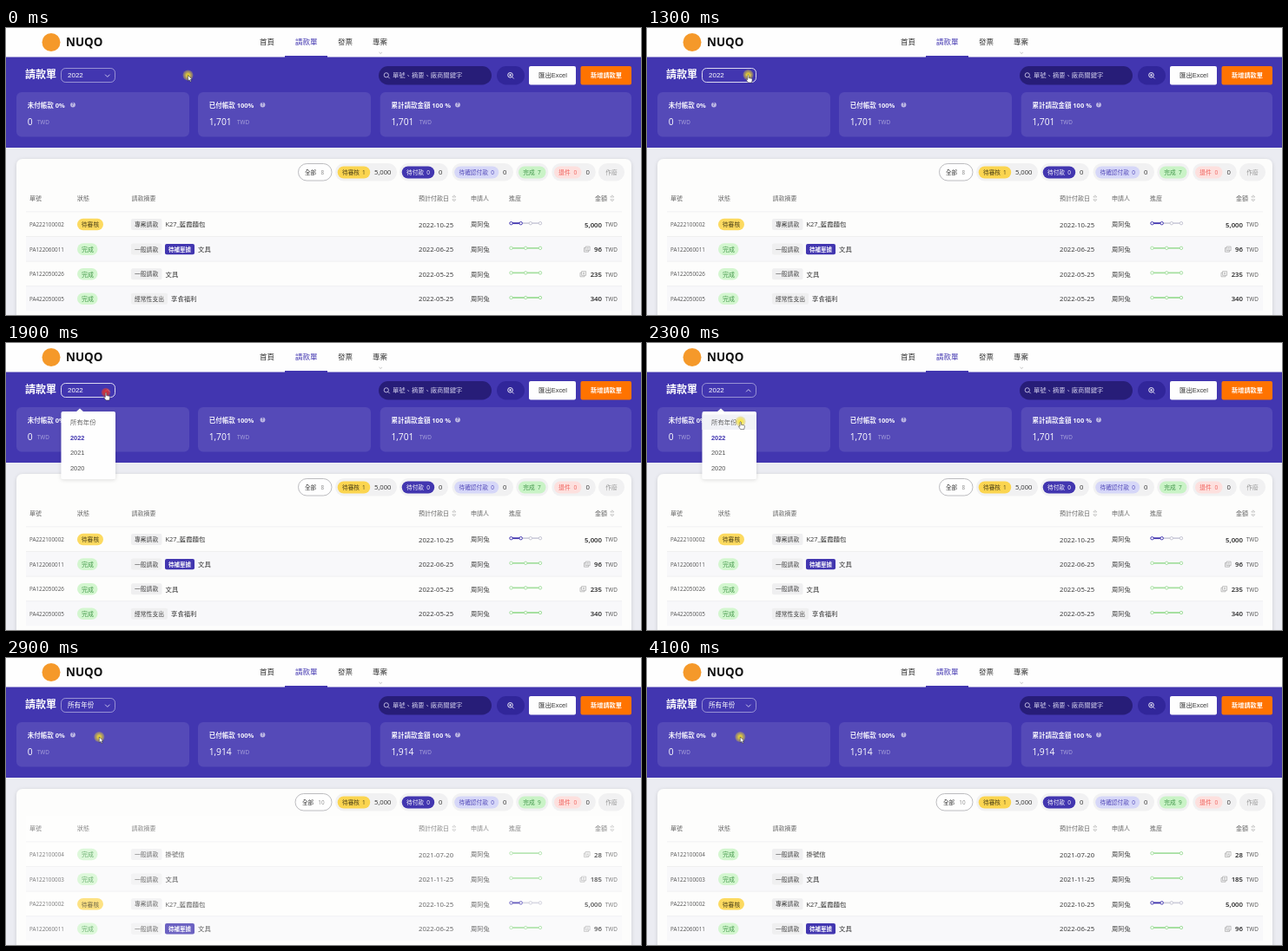
An HTML page for the animation above (5.5 s loop, 731x331 px).

```html
<!DOCTYPE html>
<html lang="zh-Hant">
<head>
<meta charset="utf-8">
<title>請款單</title>
<style>
html, body { margin: 0; width: 100%; height: 100%; overflow: hidden; background: #ebecf2; }
svg { display: block; width: 731px; height: 331px; }
text { font-family: "Open Sans", "Noto Sans CJK TC", "Noto Sans CJK", sans-serif; white-space: pre; }
.arial { font-family: "Liberation Sans", "Noto Sans CJK TC", "Noto Sans CJK", sans-serif; }
</style>
</head>
<body>
<svg id="stage" viewBox="0 0 731 331"></svg>
<script>
const PURPLE = '#4236b0', GREEN = '#a5dfa0', INK = '#333';
const $ = id => document.getElementById(id);

// Texts are placed by left edge and vertical centre.
const text = (x, cy, str, size, fill, extra = '') =>
  `<text x="${x}" y="${cy + size * 0.36}" font-size="${size}" fill="${fill}" ${extra}>${str}</text>`;
const box = (x, y, w, h, r, fill, extra = '') =>
  `<rect x="${x}" y="${y}" width="${w}" height="${h}" rx="${r}" fill="${fill}" ${extra}/>`;
const line = (d, stroke, width = 1, extra = '') =>
  `<path d="${d}" fill="none" stroke="${stroke}" stroke-width="${width}" ${extra}/>`;
const group = (id, body) => `<g id="${id}">${body}</g>`;
const BOLD = 'font-weight="700"', SEMI = 'font-weight="600"', ARIAL = 'class="arial"';

function header() {
  const nav = [[292, '首頁'], [333, '請款單'], [382, '發票'], [422, '專案']];
  return box(0, 0, 731, 34, 0, '#fefefe') +
    '<circle cx="52" cy="16.5" r="10.5" fill="#f5992a"/>' +
    text(69, 15.8, 'NUQO', 13.4, '#111', BOLD) +
    nav.map(([x, s], i) => text(x, 15.5, s, 8.5, i == 1 ? PURPLE : INK, 'font-weight="500"')).join('') +
    line('M429.5 28 l1.7 1.5 l1.7 -1.5', '#aaa', 0.7) +
    box(0, 33.5, 731, 104.5, 0, PURPLE) +
    box(321, 32, 49, 2, 0, PURPLE);
}

function toolbar() {
  return text(22, 54, '請款單', 12, '#fff', BOLD) +
    box(63.5, 46.5, 62, 16, 5, 'none', 'id="select" stroke="#fff" stroke-width="0.9"') +
    text(71, 54.5, '', 8, '#fff', ARIAL + ' id="year"') +
    group('chevron', line('M-2.7 1.3 L0 -1.4 L2.7 1.3', '#d5d2f0', 0.9)) +
    box(429, 44, 130, 21.5, 10.7, '#271d78') +
    '<circle cx="437.8" cy="54.3" r="2.6" fill="none" stroke="#dddaf5" stroke-width="0.8"/>' +
    line('M439.8 56.3 l1.9 1.9', '#dddaf5', 0.8) +
    text(445, 54.7, '單號、摘要、廠商關鍵字', 7.3, '#cfccea') +
    box(565, 44, 32, 21.5, 10.7, '#31269a') +
    '<circle cx="580.5" cy="54.3" r="2.8" fill="none" stroke="#fff" stroke-width="0.9"/>' +
    line('M582.6 56.4 l2 2 M579.1 54.3 h2.8 M580.5 52.9 v2.8', '#fff', 0.8) +
    box(602, 44, 54, 21.5, 2, '#fefefe') +
    text(613, 54.7, '匯出Excel', 7.4, INK, ARIAL) +
    box(661.5, 44, 58.5, 21.5, 2, '#ff7300') +
    text(673, 54.7, '新增請款單', 7.2, '#fff', BOLD);
}

function card(x, w, title, help, amount, id) {
  return box(x, 74, w, 51.5, 6, '#554ab8') +
    text(x + 12.7, 89.5, title, 7.5, '#f4f3fc', BOLD) +
    `<circle cx="${help}" cy="88.6" r="2.9" fill="#bdb8e3"/>` +
    text(help - 1.2, 88.7, '?', 4.6, '#4a3fb2', BOLD) +
    text(x + 12.7, 107.8, amount, 10.3, '#fff', `id="${id}"`) +
    text(x + (amount.length > 1 ? 45 : 23.7), 109, 'TWD', 6.4, '#aaa4dc');
}

function pill(x, w, inner, fill, ink, label, count, countX, total, id = '') {
  return box(x, 156, w, 20.5, 10, '#f1f1f2') +
    box(x + 2.7, 159.5, inner, 14, 7, fill) +
    text(x + 8, 166.5, label, 6.7, ink) +
    text(countX, 166.5, count, 6.5, ink, id) +
    (total ? text(...total, 7.7, INK) : '');
}

const sorter = x => line(`M${x - 2} 195 l2 -2.2 l2 2.2 Z M${x - 2} 197.8 l2 2.2 l2 -2.2 Z`, '#aaa', 0.6);

function panel() {
  const heads = [[27, '單號'], [82, '狀態'], [144.5, '請款摘要'], [475, '預計付款日'],
    [535, '申請人'], [579, '進度'], [678, '金額']];
  return box(12, 151, 708, 190, 7, '#fdfdfc', 'filter="url(#soft)"') +
    box(336.5, 156.5, 38.5, 19.5, 9.7, '#fefefe', 'id="allBox" stroke="#b5b5b8" stroke-width="0.9"') +
    text(344, 166.5, '全部', 6.6, INK, 'id="allText"') +
    text(362.5, 166.5, '8', 6.3, '#888', 'id="allCount"') +
    pill(379, 71, 37.5, '#fbd550', '#4d4218', '待審核', '1', 410, [424, 166.5, '5,000']) +
    pill(453, 56, 37.5, PURPLE, '#fff', '待付款', '0', 484.3, [498, 166.5, '0']) +
    pill(513.5, 70.5, 51, '#d6d7f8', '#5147b8', '待確認付款', '0', 558.2, [572, 166.5, '0']) +
    pill(587.3, 37, 31.5, '#c9f3c6', '#40964a', '完成', '7', 612, null, 'id="doneCount"') +
    pill(628.3, 50.5, 31.5, '#fde0de', '#f0605a', '退件', '0', 653.5, [667.5, 166.5, '0']) +
    box(682, 156, 30, 20.5, 10, '#f1f1f2') + text(690.3, 166.5, '作廢', 6.7, '#999') +
    heads.map(([x, s]) => text(x, 196.8, s, 7, '#666')).join('') + sorter(515.8) + sorter(697.8);
}

function progress(y, steps, done) {
  const at = i => 581.5 + 33.5 * i / (steps - 1);
  let out = line(`M581.5 ${y} H615`, done ? GREEN : '#cfcfdc', 1.8);
  if (!done) out += line(`M581.5 ${y} H${at(1)}`, PURPLE, 1.8);
  for (let i = 0; i < steps; i++) {
    const color = done ? GREEN : i < 2 ? PURPLE : '#c6c6d4';
    out += `<circle cx="${at(i)}" cy="${y}" r="1.7" fill="#fff" stroke="${color}" stroke-width="1"/>`;
  }
  return out;
}

function row(r, i) {
  const y = 226.5 + 28.6 * i, tagWidth = r.tag.length > 4 ? 42 : 35.5;
  let x = 144 + tagWidth + 4;
  let out = box(23, y - 14.6, 686, 28.6, 0, i % 2 ? '#f8f8fa' : '#fdfdfc') +
    line(`M23 ${y - 14.6} H709`, '#ececee', 0.8) +
    text(27, y + 0.4, r.id, 6.3, '#555') +
    (r.done ? box(82, y - 6.8, 23.5, 13.6, 6.8, '#d3f6cf') + text(87, y + 0.4, '完成', 7, '#459a4c')
            : box(82, y - 6.8, 30, 13.6, 6.8, '#fcda60') + text(86.8, y + 0.4, '待審核', 6.8, '#4d4218')) +
    box(144, y - 6.5, tagWidth, 13, 2, '#efeff0') + text(148, y + 0.3, r.tag, 6.8, '#444');
  if (r.badge) {
    out += box(183, y - 6.2, 34, 12.4, 2, PURPLE) + text(187, y + 0.3, '待補單據', 6.5, '#fff', BOLD);
    x = 221;
  }
  out += text(x, y + 0.2, r.what, 7.4, INK) +
    text(475, y + 0.4, r.date, 7.7, INK) +
    text(535, y + 0.4, '周阿兔', 7.2, '#444') +
    progress(y - 1.3, r.steps, r.done) +
    text(686, y + 0.2, r.sum, 7.8, '#222', SEMI + ' text-anchor="end"') +
    text(689.8, y + 0.5, 'TWD', 6.4, '#555');
  if (r.copy) {
    const cx = 686 - r.sum.length * 4.5 - 11.5;
    out += line(`M${cx + 1.6} ${y - 3} h5 v4.6 h-5 Z M${cx + 1.6} ${y - 1.5} h-1.6 v4.6 h5 v-1.5 M${cx + 3} ${y - 1.4} h2.2 M${cx + 3} ${y} h2.2`, '#999', 0.6);
  }
  return out;
}

const entry = (id, done, tag, what, date, steps, sum, copy, badge) =>
  ({ id, done, tag, what, date, steps, sum, copy, badge });
const cake = entry('PA222100002', 0, '專案請款', 'K27_藍霞麵包', '2022-10-25', 4, '5,000');
const paper = entry('PA122060011', 1, '一般請款', '文具', '2022-06-25', 3, '96', 1, 1);
const rows2022 = [cake, paper,
  entry('PA122050026', 1, '一般請款', '文具', '2022-05-25', 3, '235', 1),
  entry('PA422050005', 1, '經常性支出', '享食福利', '2022-05-25', 3, '340')];
const rowsAll = [
  entry('PA122100004', 1, '一般請款', '掛號信', '2021-07-20', 2, '28', 1),
  entry('PA122100003', 1, '一般請款', '文具', '2021-11-25', 2, '185', 1),
  cake, paper];

function dropdown() {
  const years = ['2022', '2021', '2020'];
  return '<path d="M80.5 79.5 L85 75.5 L89.5 79.5 Z" fill="#fefefe"/>' +
    box(63.5, 79, 62.5, 78, 2, '#fefefe', 'filter="url(#soft)"') +
    box(63.5, 82.5, 62.5, 17.5, 0, '#f1f2f7', 'id="hover"') +
    text(74, 91, '所有年份', 7.4, '#666') +
    years.map((s, i) => text(74, 109 + 17.8 * i, s, 7.4, i ? '#555' : PURPLE, ARIAL + (i ? '' : BOLD))).join('');
}

const pointer =
  '<circle id="halo" r="6"/>' +
  group('arrow', '<path d="M0 0 V6.6 L1.6 5.2 L2.7 7.6 L3.8 7.1 L2.7 4.8 H4.8 Z" fill="#fff" stroke="#222" stroke-width="0.5"/>') +
  group('hand', '<path d="M-0.7 0.6 Q0 -0.4 0.7 0.6 V3.6 L4 4.3 Q4.9 4.6 4.7 5.8 L4 9 H0 L-2.3 5.8 Q-2.2 4.7 -0.7 5.6 Z" fill="#fff" stroke="#222" stroke-width="0.5"/>');

$('stage').innerHTML = `
  <defs>
    <filter id="soft" x="-10%" y="-10%" width="120%" height="120%">
      <feDropShadow dx="0" dy="1" stdDeviation="2" flood-color="#223" flood-opacity="0.14"/>
    </filter>
    <radialGradient id="yellow"><stop offset="0.3" stop-color="#ffe81e" stop-opacity="0.8"/><stop offset="1" stop-color="#d8c23c" stop-opacity="0.3"/></radialGradient>
    <radialGradient id="red"><stop offset="0.5" stop-color="#e0332c" stop-opacity="0.85"/><stop offset="1" stop-color="#d8403c" stop-opacity="0.45"/></radialGradient>
  </defs>` +
  box(0, 0, 731, 331, 0, '#ebecf2') + header() + toolbar() +
  card(12, 199, '未付帳款 0%', 77, '0', 'unpaid') +
  card(221, 199, '已付帳款 100%', 295.5, '1,701', 'paid') +
  card(430.7, 289.3, '累計請款金額 100 %', 520, '1,701', 'total') +
  panel() + group('before', rows2022.map(row).join('')) + group('after', rowsAll.map(row).join('')) +
  group('mask', box(23, 182, 686, 149, 0, '#fdfdfc')) +
  '<circle id="spinner" cx="366" cy="312.4" r="8.4" fill="none" stroke="#4236b0" stroke-width="0.9" stroke-linecap="round"/>' +
  group('menu', dropdown()) + group('pointer', pointer);

const set = (id, name, value) => $(id).setAttribute(name, value);
const show = (id, on) => set(id, 'visibility', on ? 'visible' : 'hidden');
const put = (id, str) => { $(id).textContent = str; };
const ramp = (t, from, length) => Math.min(1, Math.max(0, (t - from) / length));
const smooth = p => p * p * (3 - 2 * p);
const easeOut = (p, power) => 1 - (1 - p) ** power;

// Pointer stops: time, x, y
const path = [[800, 209.5, 54.5], [1250, 116.5, 54], [1300, 116.5, 54], [1350, 115, 57],
  [1950, 115, 57], [2300, 107.7, 90.6], [2500, 107.3, 91]];

function pointerAt(t) {
  let [, x, y] = path[0];
  for (let i = 1; i < path.length; i++) {
    const [t0, x0, y0] = path[i - 1], [t1, x1, y1] = path[i];
    const p = smooth(ramp(t, t0, t1 - t0));
    x += (x1 - x0) * p;
    y += (y1 - y0) * p;
  }
  return [x, y];
}

const OPEN = 1550, CLOSE = 2600, SWAP = 2800;

function draw(t) {
  const [x, y] = pointerAt(t);
  const pressed = t >= 1400 && t < 1950 || t >= CLOSE && t < 2850;
  const overSelect = x < 125 && y < 63;
  const hand = overSelect || t > 1950 && t < 2650;
  set('pointer', 'transform', `translate(${x} ${y})`);
  set('halo', 'fill', pressed ? 'url(#red)' : 'url(#yellow)');
  set('halo', 'r', pressed ? 5.2 : 6);
  show('arrow', !hand);
  show('hand', hand);

  const closing = t >= CLOSE;
  const p = closing ? ramp(t, CLOSE, 300) : ramp(t, OPEN, 300);
  const open = closing ? 1 - easeOut(p, 5) : easeOut(p, 5);
  set('menu', 'transform', `translate(0 ${79 * (1 - open)}) scale(1 ${open})`);
  set('menu', 'opacity', open);
  show('menu', open > 0.01);
  show('hover', open > 0.01 && y > 82 && !(t >= 2650));
  const turn = closing ? 180 * easeOut(p, 2) : 180 * (1 - easeOut(p, 2));
  set('chevron', 'transform', `translate(116.8 55) rotate(${turn})`);
  set('select', 'stroke-opacity', overSelect ? 0.9 : 0.5);
  const picked = t >= 2650;
  put('year', picked ? '所有年份' : '2022');
  set('year', 'font-size', picked ? 7.6 : 8);

  const swapped = t >= SWAP;
  show('before', !swapped);
  show('after', swapped);
  put('paid', swapped ? '1,914' : '1,701');
  put('total', swapped ? '1,914' : '1,701');
  put('doneCount', swapped ? '9' : '7');
  put('allCount', swapped ? '10' : '8');
  set('allBox', 'x', swapped ? 333 : 336.5);
  set('allBox', 'width', swapped ? 42 : 38.5);
  set('allText', 'x', swapped ? 341 : 344);
  set('allCount', 'x', swapped ? 359.3 : 362.5);

  set('mask', 'opacity', 0.55 * Math.min(ramp(t, CLOSE, 140), 1 - ramp(t, 2750, 250)));
  const spin = t - CLOSE;
  show('spinner', spin >= 50 && !swapped);
  set('spinner', 'stroke-dasharray', `${0.3 + 6 * ramp(spin, 100, 300) ** 2} 60`);
  set('spinner', 'transform', `rotate(${spin * 0.18} 366 312.4)`);
}

const start = performance.now();
function frame() {
  const t = (performance.now() - start) % 5500;
  draw(Math.floor(t / 50) * 50);
  requestAnimationFrame(frame);
}
frame();
</script>
</body>
</html>
```
